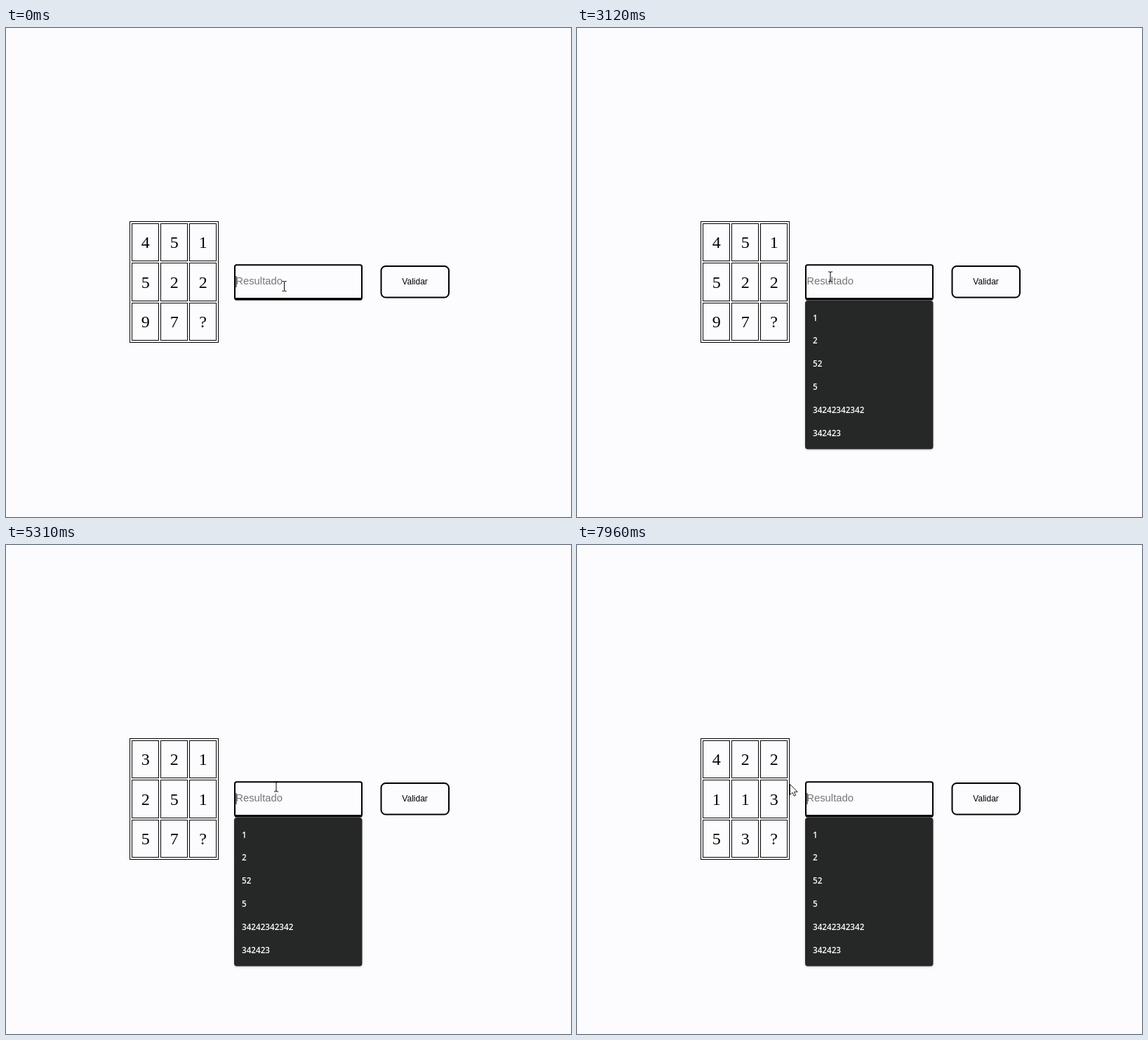
An HTML page for the animation above (8000 ms loop, 805x696 px).

```html
<!DOCTYPE html>
<html lang="es">
<head>
<meta charset="utf-8">
<title>Validar</title>
<style>
  html, body { margin: 0; width: 100%; height: 100%; overflow: hidden; background: #fcfcfe; }
  svg { display: block; width: 100%; height: 100%; }
  .line { fill: none; stroke: #000; }
  .digit { font: 24px "Liberation Serif", serif; text-anchor: middle; }
  .field { font: 14.8px "Liberation Sans", sans-serif; }
  .label { font: 12px "Liberation Sans", sans-serif; text-anchor: middle; }
  .item { font: 600 11.7px "Open Sans", sans-serif; fill: #fff; }
  #menu { filter: drop-shadow(0 1px 1.5px rgba(0, 0, 40, .2)); }
  #button { fill: none; stroke: #000; stroke-width: 2; }
  #button.hover { fill: #000; stroke: #fcfcfe; }
  #button.hover + text { fill: #fff; }
</style>
</head>
<body>
<svg viewBox="0 0 805 696">
  <g id="table"><rect class="line" x="176.5" y="275.5" width="126" height="172"/></g>

  <rect x="326" y="384" width="181" height="2.6"/>
  <g id="ring">
    <rect class="line" x="326" y="337.3" width="181" height="49" rx="2.5" stroke-width="2"/>
    <rect x="326" y="384" width="181" height="3.4" rx="1"/>
  </g>
  <text id="value" class="field" x="327.3" y="365"></text>
  <rect id="caret" y="353" width="1" height="16"/>

  <rect id="button" x="534.5" y="339" width="96.5" height="44.5" rx="6.5"/>
  <text class="label" x="582.6" y="365">Validar</text>

  <g id="menu"><rect x="325" y="388" width="182.5" height="211.5" rx="4" fill="#262727"/></g>

  <g id="pointer">
    <path id="beam" class="line" d="M-3-7H-1.2Q0-7 0-5.8Q0-7 1.2-7H3M0-6V6M-3 7H-1.2Q0 7 0 5.8Q0 7 1.2 7H3"/>
    <path id="arrow" fill="#fff" stroke="#222" d="M.5.5V15.6L4 12.3 6.2 17.2 8.6 16.2 6.4 11.4H11Z"/>
    <path id="hand" fill="#fff" stroke="#111" stroke-linejoin="round"
      d="M-2 13V1.8Q-2 .3-.4.3T1.3 1.8V7.3Q2.8 6.3 4 7.8Q5.6 7 6.6 8.6Q8.5 8 8.5 10.3V14.5Q8.5 17 7 18.5V20.8H-1.4V19L-6 13.2Q-7.2 11.4-5.7 10.6T-3.4 11.6Z"/>
  </g>
</svg>
<script>
const LOOP = 8000, BLINK = 520, FADE = 150;
const $ = id => document.getElementById(id);

function add(parent, tag, attrs) {
  const el = document.createElementNS('http://www.w3.org/2000/svg', tag);
  for (const key in attrs) el.setAttribute(key, attrs[key]);
  return parent.appendChild(el);
}

const colX = c => 198.7 + 41 * c;
const rowY = r => 305 + 56.5 * r;

const digits = Array.from({ length: 9 }, (_, i) => {
  const c = i % 3, r = Math.floor(i / 3);
  const top = Math.round(rowY(r) - 27.25), bottom = Math.round(rowY(r) + 27.25);
  add($('table'), 'rect', {
    class: 'line', x: 179.5 + 41 * c, y: top + .5, width: 38, height: bottom - top - 1
  });
  return add($('table'), 'text', { class: 'digit', x: colX(c), y: rowY(r) + 8 });
});
const items = Array.from({ length: 6 }, (_, i) =>
  add($('menu'), 'text', { class: 'item', x: 336, y: 416.6 + 32.8 * i }));

// One round: focus the field, open the menu, type the answer, press the button.
const history = ['1', '2', '52', '5', '34242342342', '342423'];
const matches = ['3', '3.5', '32423423423', '342423', '3424234', '34242342342'];
const rounds = [
  { start: 0, top: '451522', focus: -120, open: 190, key: 3400, answer: '3', press: 4100, matches },
  { start: 4250, top: '321251', focus: 4700, open: 5110, key: 5580, answer: '2', press: 6125 },
  { start: 6210, top: '422113', focus: 6580, open: 6750, key: Infinity, press: Infinity }
];

// Pointer moves: start, end, x, y
const home = [396.5, 367.5];
const moves = [
  [230, 550, 240, 304],
  [1430, 1620, 240, 416],
  [1620, 1760, 284, 306],
  [1760, 2020, 284, 416],
  [2250, 2650, 351, 354],
  [3050, 3120, 361, 354],
  [3420, 3710, 599, 371],
  [4270, 4840, 385, 344],
  [5400, 5640, 565, 352],
  [5640, 5890, 586, 362],
  [6210, 6440, 501, 341],
  [6440, 6700, 392, 362],
  [7780, 7960, 303, 340]
];

const clamp = v => Math.max(0, Math.min(1, v));
const ease = k => k * k * (3 - 2 * k);

// Each column of the board adds up to its bottom cell; the last sum is the question.
function boardOf(top) {
  const sum = c => Number(top[c]) + Number(top[c + 3]);
  return top + sum(0) + sum(1) + '?';
}

function pointerAt(t) {
  let [x, y] = home;
  for (const [start, end, toX, toY] of moves) {
    const k = ease(clamp((t - start) / (end - start)));
    x += (toX - x) * k;
    y += (toY - y) * k;
  }
  return [x, y];
}

function pointerKind(x, y) {
  if (x > 533 && x < 632 && y > 338 && y < 385) return 'hand';
  if (x > 326 && x < 507 && y > 343 && y < 387) return 'beam';
  const c = Math.round((x - colX(0)) / 41), r = Math.round((y - rowY(0)) / 56.5);
  const onDigit = c >= 0 && c < 3 && r >= 0 && r < 3 &&
    Math.abs(x - colX(c)) < 8 && Math.abs(y - rowY(r)) < 14;
  return onDigit ? 'beam' : 'arrow';
}

const show = (id, on) => $(id).setAttribute('visibility', on ? 'visible' : 'hidden');

function drawField(t, round) {
  const { focus, open, key, press } = round;
  const typed = t >= key, focused = t >= focus && t < press;
  $('value').textContent = typed ? round.answer : 'Resultado';
  $('value').setAttribute('fill', typed ? '#111' : '#757575');
  show('ring', focused);

  const reset = [focus, open, key].filter(e => e <= t).pop();
  show('caret', focused && Math.floor((t - reset) / BLINK) % 2 === 0);
  $('caret').setAttribute('x', typed ? 335.2 : 327.5);
}

function drawMenu(t, { open, key, press, matches }) {
  const close = matches ? press : key;
  const alpha = Math.min(clamp((t - open) / FADE), clamp(1 - (t - close) / FADE));
  const list = matches && t >= key ? matches : history;
  items.forEach((el, i) => el.textContent = list[i]);
  $('menu').setAttribute('opacity', alpha);
  $('menu').setAttribute('transform',
    `translate(416.2 494) scale(${.95 + .05 * alpha}) translate(-416.2 -494)`);
}

function drawPointer(t) {
  const [x, y] = pointerAt(t), kind = pointerKind(x, y);
  $('pointer').setAttribute('transform', `translate(${x} ${y})`);
  for (const id of ['beam', 'arrow', 'hand']) show(id, id === kind);
  $('button').classList.toggle('hover', kind === 'hand');
}

function draw(t) {
  const round = rounds.filter(r => r.start <= t).pop();
  const board = boardOf(round.top);
  digits.forEach((d, i) => d.textContent = board[i]);
  drawField(t, round);
  drawMenu(t, round);
  drawPointer(t);
}

const begin = performance.now();
function tick() {
  draw((performance.now() - begin) % LOOP);
  requestAnimationFrame(tick);
}
tick();
</script>
</body>
</html>
```
